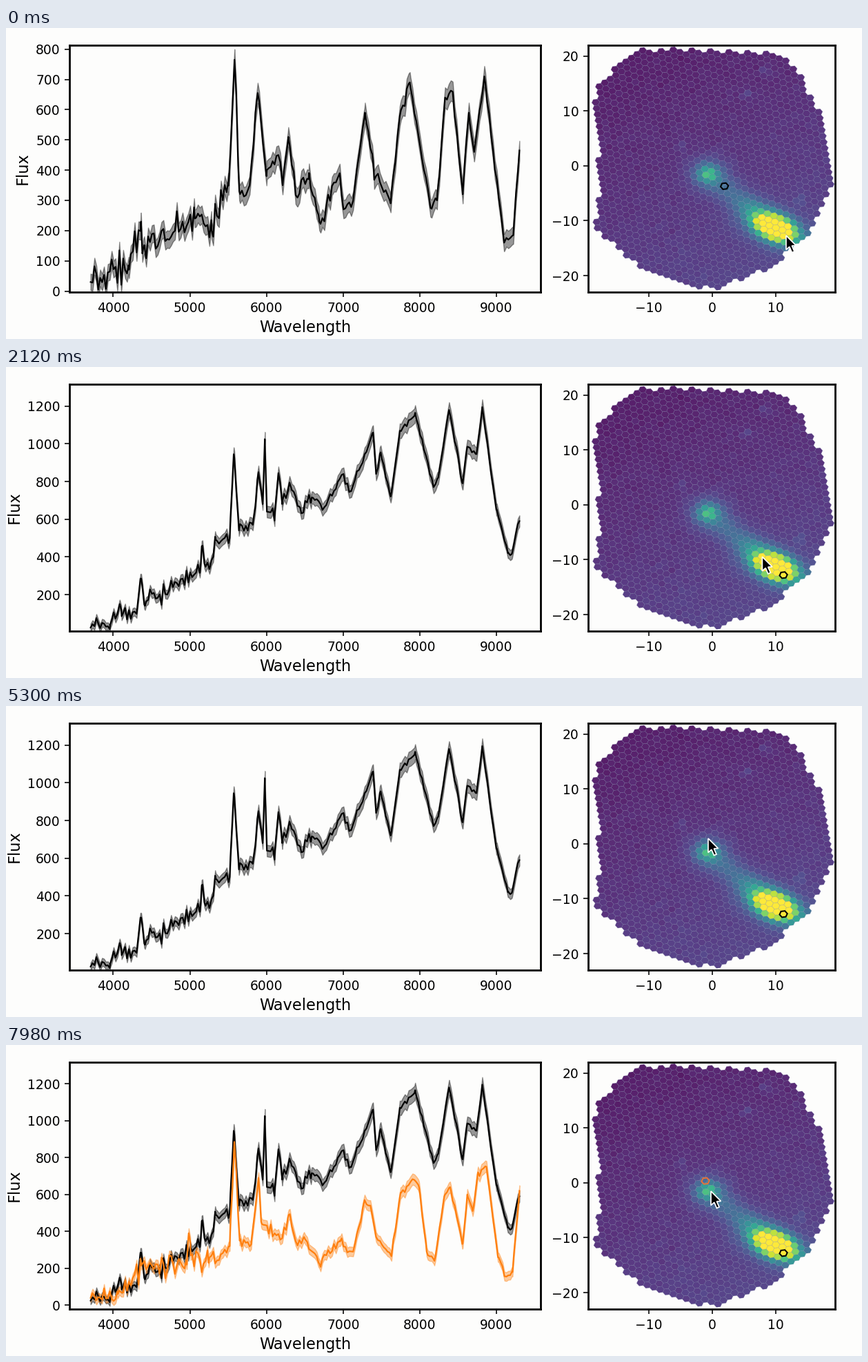
These frames come from a looping animation (1241x451 px, 8 s). A matplotlib script:

```python
import numpy as np
import matplotlib.pyplot as plt
from matplotlib.animation import FuncAnimation
from matplotlib.collections import PolyCollection
from matplotlib.patches import Polygon
from matplotlib.path import Path
from matplotlib.transforms import IdentityTransform

W, H, DPI = 1241, 451, 128
PX = 72 / DPI                       # points per pixel
LOOP, STEP = 8000, 50
BG = "#fdfdfc"
FIRST_PICK, SECOND_PICK = 400, 7540
rng = np.random.default_rng(4)

plt.rcParams.update({
    "font.family": "DejaVu Sans",
    "axes.linewidth": 2.8 * PX, "axes.facecolor": BG,
    "axes.labelsize": 22.5 * PX, "axes.labelpad": 7.5 * PX,
})
for t in ("xtick", "ytick"):
    plt.rcParams.update({t + ".labelsize": 18.8 * PX,
                         t + ".major.size": 6.6 * PX,
                         t + ".major.pad": 6.6 * PX,
                         t + ".major.width": 1.6 * PX})

fig = plt.figure(figsize=(W / DPI, H / DPI), dpi=DPI, facecolor=BG)


def axes_at(x0, x1, y0=24.5, y1=383.3):
    return fig.add_axes([x0 / W, 1 - y1 / H, (x1 - x0) / W, (y1 - y0) / H])


spec = axes_at(92, 775)
sky = axes_at(843.5, 1202)
spec.set(xlim=(3429, 9576), xlabel="Wavelength", ylabel="Flux")
spec.set_xticks(range(4000, 9001, 1000))
sky.set(xlim=(-19.65, 19.35), ylim=(-23.05, 22.05))
sky.set_xticks(range(-10, 11, 10))
sky.set_yticks(range(-20, 21, 10))

# ---- spectra: main turning points, the fine jitter is random ----
FAINT = [
    (3705, 30), (4200, 85), (4362, 230), (4395, 145), (5065, 240),
    (5285, 200), (5500, 360), (5582, 765), (5645, 330), (5780, 350),
    (5885, 655), (6000, 380), (6155, 450), (6210, 350), (6285, 510),
    (6400, 310), (6550, 370), (6690, 230), (6955, 390), (7005, 270),
    (7120, 290), (7285, 590), (7400, 400), (7620, 290), (7740, 580),
    (7870, 690), (8140, 275), (8225, 300), (8330, 640), (8425, 660),
    (8560, 320), (8640, 590), (8710, 460), (8842, 710), (9100, 160),
    (9220, 185), (9300, 465)]
BRIGHT = [
    (3705, 25), (3960, 40), (4085, 150), (4110, 85), (4300, 100),
    (4365, 285), (4415, 140), (4735, 235), (5140, 350), (5165, 460),
    (5190, 365), (5265, 350), (5340, 490), (5520, 500), (5572, 945),
    (5640, 540), (5820, 570), (5895, 850), (5950, 680), (5978, 1025),
    (6005, 640), (6110, 645), (6155, 845), (6210, 700), (6300, 795),
    (6440, 660), (6590, 715), (6780, 675), (6980, 835), (7100, 750),
    (7390, 1060), (7430, 840), (7490, 955), (7620, 720), (7740, 1070),
    (7940, 1165), (8180, 770), (8240, 820), (8382, 1180), (8560, 790),
    (8620, 985), (8740, 945), (8815, 1195), (9000, 650), (9150, 420),
    (9200, 415), (9300, 590)]
NUCLEUS = [
    (3705, 40), (4060, 60), (4365, 215), (4960, 220), (4985, 390),
    (5010, 270), (5245, 230), (5520, 320), (5580, 885), (5650, 350),
    (5800, 330), (5895, 690), (5940, 440), (6180, 355), (6290, 490),
    (6400, 330), (6490, 370), (6690, 225), (6960, 345), (7130, 290),
    (7280, 570), (7350, 540), (7430, 370), (7630, 265), (7750, 610),
    (7900, 680), (7990, 640), (8090, 290), (8190, 240), (8320, 590),
    (8395, 640), (8560, 335), (8620, 600), (8690, 510), (8760, 720),
    (8870, 750), (9020, 260), (9130, 155), (9210, 180), (9300, 620)]


def draw_spectrum(points, color, err0, slope, rough):
    kx, ky = np.array(points).T
    x = np.union1d(np.arange(3705, 9301, 25), kx)
    y = np.interp(x, kx, ky)
    sigma = np.interp(x, [5300, 5600, 7000, 7600], [rough, 18, 14, 8])
    y += rng.normal(0, sigma) * ~np.isin(x, kx)
    y = np.maximum(y, 5)
    err = err0 + slope * y
    band = spec.fill_between(x, y - err, y + err, color=color, alpha=0.4,
                             lw=1.4 * PX)
    line, = spec.plot(x, y, color=color, lw=2.2 * PX)
    return band, line


faint = draw_spectrum(FAINT, "black", 27, 0.01, 28)
bright = draw_spectrum(BRIGHT, "black", 20, 0.017, 26)
nucleus = draw_spectrum(NUCLEUS, "tab:orange", 22, 0.012, 30)

# ---- hexagonal sky map ----
R, TILT = 0.64, np.radians(8)
ang = TILT + np.arange(6) * np.pi / 3
HEX = R * np.c_[np.cos(ang), np.sin(ang)]
FAINT_POS, BRIGHT_POS, NUCLEUS_POS = (1.9, -3.7), (11.2, -12.8), (-1.1, 0.35)

FIELD = 0.985 * np.array([
    (-11.3, 21.4), (-7.5, 21.6), (10.4, 20.8), (13.2, 18.2), (18, 8.8),
    (19, 2), (18.9, -3.5), (15.7, -13), (8.8, -18.9), (1.2, -22.6),
    (-2.6, -22.5), (-11.3, -18.9), (-19.1, -11.3), (-18.2, -7),
    (-18.3, 6.3), (-18.9, 13.8), (-14.6, 19.5)])

i, j = (g.ravel() for g in np.mgrid[-60:61, -60:61])
a1, a2 = TILT + np.pi / 6, TILT + np.pi / 2
pitch = R * np.sqrt(3)
cells = np.c_[BRIGHT_POS[0] + pitch * (i * np.cos(a1) + j * np.cos(a2)),
              BRIGHT_POS[1] + pitch * (i * np.sin(a1) + j * np.sin(a2))]
cells = cells[Path(FIELD).contains_points(cells)]


def blob(x, y, cx, cy, s_long, s_short, tilt=0.0):
    c, s = np.cos(tilt), np.sin(tilt)
    u = (x - cx) * c + (y - cy) * s
    v = (y - cy) * c - (x - cx) * s
    return np.exp(-0.5 * ((u / s_long) ** 2 + (v / s_short) ** 2))


def brightness(x, y):
    v = 0.085 + 0.0015 * x - 0.0025 * y + rng.normal(0, 0.008, x.size)
    v += 0.32 * blob(x, y, -0.65, -1.5, 1, 1)
    v += 0.18 * blob(x, y, -0.65, -1.5, 2.2, 2.2)
    slant = np.radians(-28)
    v += 1.25 * blob(x, y, 10, -11.3, 2.1, 1.2, slant)
    v += 0.4 * blob(x, y, 10, -11.4, 3.8, 2.1, slant)
    # bridge between the two sources
    dx, dy = 10.65, -9.8
    t = np.clip(((x + 0.65) * dx + (y + 1.5) * dy) / (dx**2 + dy**2), 0, 1)
    d2 = (x + 0.65 - t * dx) ** 2 + (y + 1.5 - t * dy) ** 2
    v += (0.12 + 0.18 * t) * np.exp(-d2 / 5)
    for cx, cy in [(8.3, 17.4), (13.7, -6.3), (5.5, 13), (-4.8, 3.7)]:
        v += 0.09 * blob(x, y, cx, cy, 0.6, 0.6)
    return np.clip(v, 0, 1)


colors = plt.get_cmap("viridis")(brightness(*cells.T))
colors[:, 3] = 0.9
sky.add_collection(PolyCollection(cells[:, None] + HEX, facecolors=colors,
                                  edgecolors=(0.42, 0.48, 0.62, 0.35),
                                  linewidths=0.6 * PX))


def marker(pos, color):
    return sky.add_patch(Polygon(HEX * 0.97 + pos, fill=False, ec=color,
                                 lw=2 * PX, zorder=2))


faint_mark = marker(FAINT_POS, "black")
bright_mark = marker(BRIGHT_POS, "black")
nucleus_mark = marker(NUCLEUS_POS, "#e8703a")

# ---- mouse pointer, in stage pixels ----
ARROW = np.array([(0, 0), (0, 20.5), (4.8, 16.2), (8.4, 24.6), (12, 23),
                  (8.4, 14.8), (14.5, 14.5)])
PATH = np.array([
    (0, 1131, 301), (1000, 1118, 290), (2120, 1096, 275), (3600, 1021, 191),
    (5300, 1018, 192), (6420, 1016, 192), (7400, 1015, 195),
    (7950, 1022, 212)])
pointer = Polygon(ARROW, fc="black", ec="white", lw=1.7 * PX, zorder=10)
pointer.set_transform(IdentityTransform())
fig.add_artist(pointer)


def show(artists, on):
    for a in artists:
        a.set_visible(on)


def update(n):
    t = n * STEP
    early, late = t < FIRST_PICK, t >= SECOND_PICK
    show((*faint, faint_mark), early)
    show((*bright, bright_mark), not early)
    show((*nucleus, nucleus_mark), late)
    if early:
        spec.set_yticks(range(0, 801, 100))
        spec.set_ylim(-4, 814)
    else:
        spec.set_yticks(range(0 if late else 200, 1201, 200))
        spec.set_ylim(-22 if late else 5, 1318)
    x, y = (np.interp(t, PATH[:, 0], PATH[:, k]) for k in (1, 2))
    pointer.set_xy(np.c_[x + ARROW[:, 0], H - y - ARROW[:, 1]])
    return pointer,


anim = FuncAnimation(fig, update, frames=LOOP // STEP, interval=STEP,
                     repeat=True, repeat_delay=0, blit=False)
plt.show()
```
